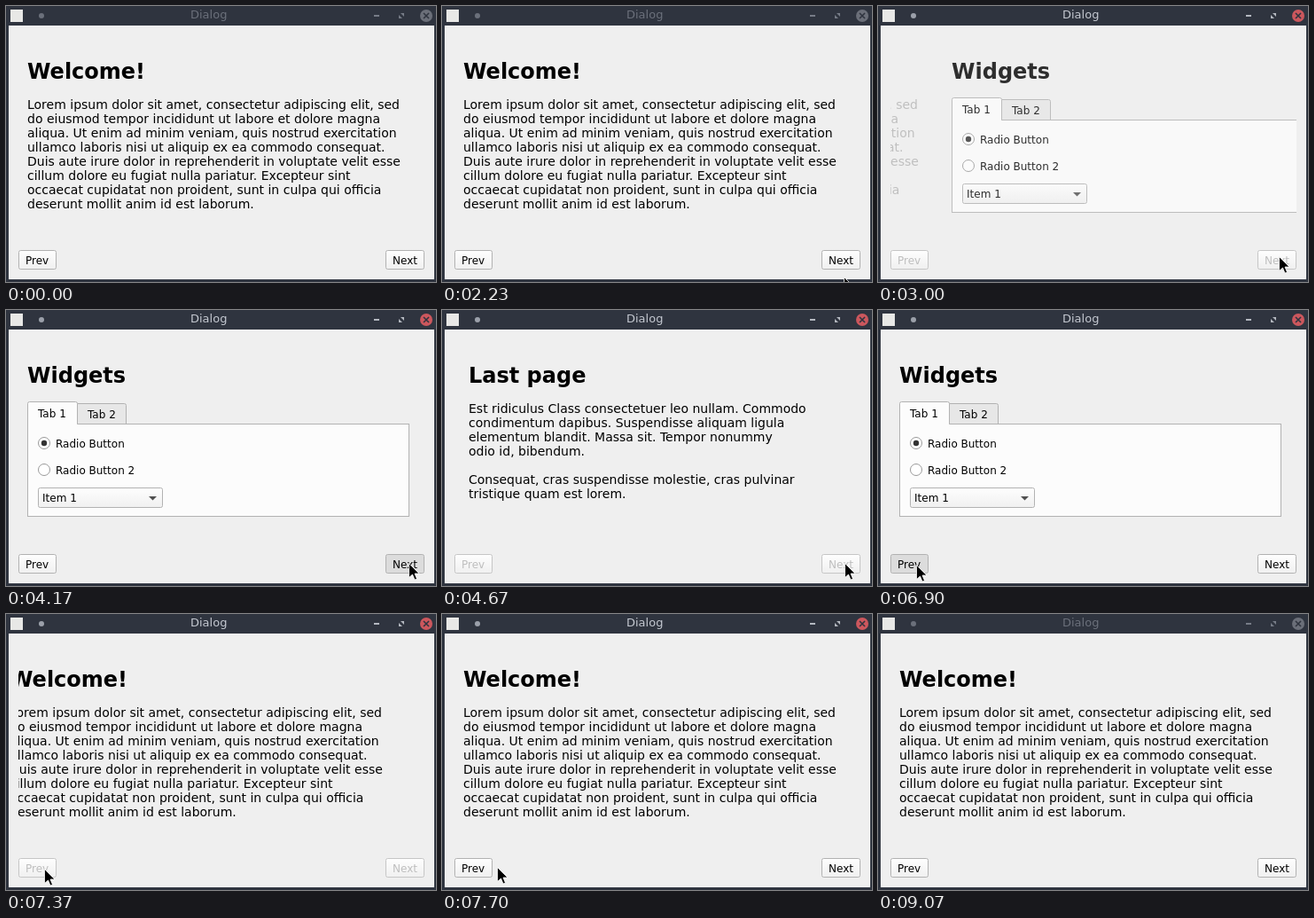
Animation, 485 px wide and 311 px high, one loop 9.13 s. Source, as an HTML page:

```html
<!DOCTYPE html>
<html lang="en">
<head>
<meta charset="utf-8">
<title>Dialog</title>
<style>
  html, body { margin: 0; width: 100%; height: 100%; overflow: hidden; background: #2f343f; }
  svg { display: block; font: 12px "DejaVu Sans", sans-serif; }
  text { white-space: pre; }
  .heading { font-size: 24px; font-weight: bold; }
  .body { font-size: 14px; }
  .frame { stroke: #b2b2b2; }
  #title { font-size: 13px; fill: #6b707b; }
  #dot { fill: #6b707b; }
  #controls { fill: #777c87; }
  #close { fill: #6b6f79; }
  .active #title { fill: #c4c8d0; }
  .active #dot { fill: #9ba0aa; }
  .active #controls { fill: #b4b8c0; }
  .active #close { fill: #cc575d; }
  .button rect { fill: url(#raised); stroke: #b2b2b2; }
  .button.pressed rect { fill: #dcdcdc; }
  .button.disabled rect { stroke: #c6c6c6; }
  .button.disabled text { fill: #bebebe; }
</style>
</head>
<body>
<svg id="window" width="485" height="311" viewBox="0 0 485 311">
  <defs>
    <linearGradient id="raised" x2="0" y2="1">
      <stop stop-color="#fefefe"/><stop offset="1" stop-color="#f0f0f0"/>
    </linearGradient>
    <clipPath id="viewport"><rect x="14" y="33" width="458" height="232"/></clipPath>
  </defs>

  <rect width="485" height="311" fill="#2f343f"/>
  <rect x="3" y="22" width="480" height="286" fill="#efefef"/>
  <rect x="5" y="4" width="14" height="14" fill="#e8e8e6"/>
  <circle id="dot" cx="40" cy="11" r="3"/>
  <text id="title" x="208" y="14">Dialog</text>
  <g id="controls">
    <rect x="415" y="10" width="6" height="2"/>
    <path d="M445 8h4v4zM443 10v4h4z"/>
  </g>
  <circle id="close" cx="474" cy="11" r="7"/>
  <path d="M471 8l6 6m0-6l-6 6" stroke="#2f343f" stroke-width="1.6"/>

  <g clip-path="url(#viewport)">
    <g class="page" id="welcome"></g>
    <g class="page">
      <text class="heading" x="24" y="82">Widgets</text>
      <path class="frame" d="M80.5 128.5V105.5H133.5q2 0 2 2V128.5" fill="#e7e7e7"/>
      <rect class="frame" x="24.5" y="128.5" width="430" height="104" fill="#fcfcfc"/>
      <path class="frame" d="M24.5 129V105.5q0-2 2-2H78.5q2 0 2 2V128.5" fill="#fcfcfc"/>
      <rect x="25" y="128" width="55" height="2" fill="#fcfcfc"/>
      <text x="36" y="121">Tab 1</text>
      <text x="92" y="122">Tab 2</text>
      <g fill="#fff" stroke="#999">
        <circle cx="43" cy="150" r="6.5"/>
        <circle cx="43" cy="180" r="6.5"/>
      </g>
      <circle cx="43" cy="150" r="3.2" fill="#333"/>
      <text x="56" y="155">Radio Button</text>
      <text x="56" y="185">Radio Button 2</text>
      <rect class="frame" x="36.5" y="200.5" width="140" height="22" rx="2" fill="url(#raised)"/>
      <text x="41" y="216">Item 1</text>
      <path d="M161 210h9l-4.5 4.5z" fill="#505050"/>
    </g>
    <g class="page" id="last"></g>
  </g>

  <g class="button" id="prev">
    <rect x="14.5" y="275.5" width="42" height="21" rx="2"/>
    <text x="22" y="291">Prev</text>
  </g>
  <g class="button" id="next">
    <rect x="428.5" y="275.5" width="43" height="21" rx="2"/>
    <text x="436" y="291">Next</text>
  </g>
  <path id="cursor" d="M0 0V16L4 12.5 6.5 18.5 9 17.5 6.5 11.5H11.5Z" stroke="#fff" stroke-width=".8"/>
</svg>

<script>
const LOOP = 9130, PAGE_WIDTH = 458, SLIDE_MS = 700, FADE_MS = 350;
const ACTIVE = [2640, 9070];
const byId = id => document.getElementById(id);
const pages = [...document.querySelectorAll('.page')];

function fillPage(id, heading, lines) {
  byId(id).innerHTML = `<text class="heading" x="24" y="82">${heading}</text>` +
    lines.map((line, i) => `<text class="body" x="24" y="${116 + 16 * i}">${line}</text>`).join('');
}
fillPage('welcome', 'Welcome!', [
  'Lorem ipsum dolor sit amet, consectetur adipiscing elit, sed',
  'do eiusmod tempor incididunt ut labore et dolore magna',
  'aliqua. Ut enim ad minim veniam, quis nostrud exercitation',
  'ullamco laboris nisi ut aliquip ex ea commodo consequat.',
  'Duis aute irure dolor in reprehenderit in voluptate velit esse',
  'cillum dolore eu fugiat nulla pariatur. Excepteur sint',
  'occaecat cupidatat non proident, sunt in culpa qui officia',
  'deserunt mollit anim id est laborum.'
]);
fillPage('last', 'Last page', [
  'Est ridiculus Class consectetuer leo nullam. Commodo',
  'condimentum dapibus. Suspendisse aliquam ligula',
  'elementum blandit. Massa sit. Tempor nonummy',
  'odio id, bibendum.',
  '',
  'Consequat, cras suspendisse molestie, cras pulvinar',
  'tristique quam est lorem.'
]);

// The slide's clock runs from start; it becomes visible at shown.
const turns = [
  { button: 'next', press: 2640, start: 2720, shown: 2720, from: 0, to: 1 },
  { button: 'next', press: 4170, start: 4205, shown: 4230, from: 1, to: 2 },
  { button: 'prev', press: 5700, start: 5648, shown: 5700, from: 2, to: 1 },
  { button: 'prev', press: 6900, start: 6991, shown: 7030, from: 1, to: 0 }
];

// time, x, y of the pointer tip
const pointer = [
  [2230, 453, 305], [2500, 453, 290], [2620, 452, 282], [3765, 452, 282],
  [3800, 454, 285], [4740, 454, 285], [4900, 340, 276], [5070, 134, 271],
  [5200, 80, 277], [5350, 55, 284], [5530, 42, 287], [6340, 42, 287],
  [6370, 42, 285], [6560, 42, 285], [6600, 43, 287], [7600, 43, 287],
  [7730, 68, 284], [8160, 68, 284], [8170, 76, 297], [8200, 76, 297]
];

const easeOutQuart = p => 1 - (1 - p) ** 4;

function placePage(index, x, opacity) {
  pages[index].setAttribute('transform', `translate(${Math.round(x)})`);
  pages[index].setAttribute('opacity', opacity);
  pages[index].style.display = '';
}

function drawPages(t) {
  const turn = turns.findLast(({ shown }) => t >= shown);
  const sliding = !!turn && t < turn.start + SLIDE_MS;
  for (const page of pages) page.style.display = 'none';
  if (sliding) {
    const elapsed = t - turn.start;
    const direction = turn.to - turn.from;
    const shift = PAGE_WIDTH * easeOutQuart(elapsed / SLIDE_MS);
    const fade = Math.min(1, elapsed / FADE_MS);
    placePage(turn.from, -direction * shift, 1 - fade);
    placePage(turn.to, direction * (PAGE_WIDTH - shift), fade);
  } else {
    placePage(turn ? turn.to : 0, 0, 1);
  }
  for (const id of ['prev', 'next']) {
    const pressed = turns.some(k => k.button === id && t >= k.press && t < k.shown);
    byId(id).classList.toggle('disabled', sliding);
    byId(id).classList.toggle('pressed', pressed);
  }
}

function drawPointer(t) {
  const i = pointer.findIndex(([time]) => t < time);
  const visible = i > 0;
  byId('cursor').style.display = visible ? '' : 'none';
  if (!visible) return;
  const [t0, x0, y0] = pointer[i - 1], [t1, x1, y1] = pointer[i];
  const p = (t - t0) / (t1 - t0);
  const mix = (a, b) => Math.round(a + (b - a) * p);
  byId('cursor').setAttribute('transform', `translate(${mix(x0, x1) + .5} ${mix(y0, y1) + .5})`);
}

const origin = performance.now();
function draw(now) {
  const t = Math.max(0, now - origin) % LOOP;
  byId('window').classList.toggle('active', t >= ACTIVE[0] && t < ACTIVE[1]);
  drawPages(t);
  drawPointer(t);
  requestAnimationFrame(draw);
}
draw(origin);
</script>
</body>
</html>
```
